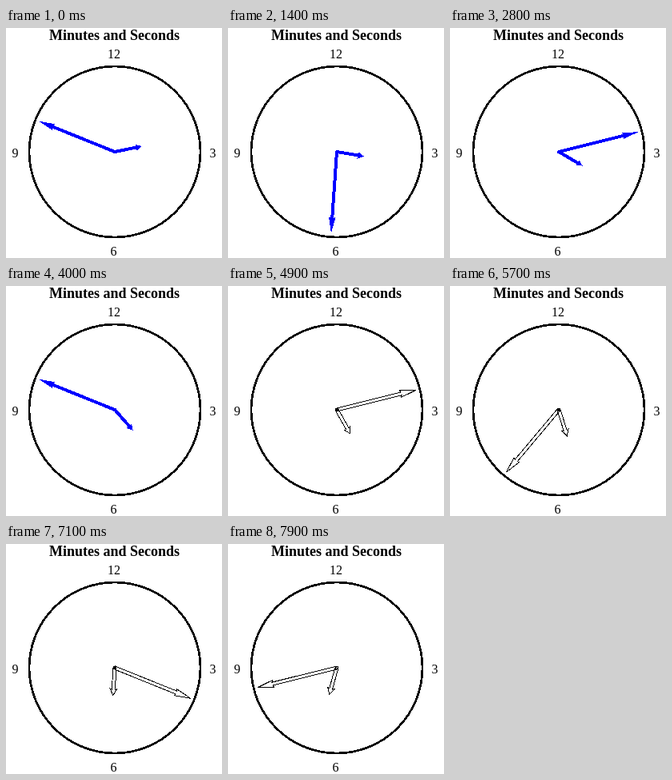
An HTML page that plays this animation: 270x288 px, repeating every 8 s.

```html
<!DOCTYPE html>
<html lang="en">
<head>
<meta charset="utf-8">
<title>Minutes and Seconds</title>
<style>
  html, body { margin: 0; width: 100%; height: 100%; overflow: hidden; background: #fff; }
  svg { display: block; width: 270px; height: 288px; }
  text { font: 16px "Liberation Serif", "Times New Roman", serif; text-anchor: middle; }
  .title { font-size: 18px; font-weight: bold; }
  .shapes { shape-rendering: crispEdges; }
</style>
</head>
<body>
<svg viewBox="0 0 270 288">
  <rect width="270" height="288" fill="#fff"/>
  <text class="title" x="135.5" y="15">Minutes and Seconds</text>
  <text x="135" y="38">12</text>
  <text x="258.5" y="162">3</text>
  <text x="134.5" y="285">6</text>
  <text x="11.5" y="162">9</text>
  <g class="shapes">
    <circle cx="136" cy="155" r="107" fill="none" stroke="#000" stroke-width="2.7"/>
    <g id="hands">
      <path id="minute"/>
      <path id="second"/>
      <circle id="pivot" cx="136" cy="155" r="2"/>
    </g>
  </g>
</svg>
<script>
  const STEP = 100, STEPS = 80;
  const CENTER = { x: 136, y: 155 };
  const [hands, minute, second] =
    ["hands", "minute", "second"].map(id => document.getElementById(id));

  // An arrow from the centre; angle in degrees clockwise from 12.
  function arrow(angle, length, head) {
    const a = angle * Math.PI / 180, sin = Math.sin(a), cos = Math.cos(a);
    const neck = length - head + 1;
    const points = [
      [0, -2], [neck, -2], [length - head, -4.3], [length, 0],
      [length - head, 4.3], [neck, 2], [0, 2]
    ].map(([along, side]) =>
      (CENTER.x + along * sin + side * cos).toFixed(2) + " " +
      (CENTER.y - along * cos + side * sin).toFixed(2));
    return "M" + points.join("L") + "Z";
  }

  function draw(time) {
    const step = Math.floor(time / STEP) % STEPS;
    const tick = Math.floor(step / 2);
    const outlined = step % 2 === 1;
    second.setAttribute("d", arrow(292 + tick * 36, 102, 20));
    minute.setAttribute("d", arrow(78.6 + tick * 3, 34.5, 8));
    hands.setAttribute("fill", outlined ? "none" : "#00f");
    hands.setAttribute("stroke", outlined ? "#000" : "none");
  }

  const start = performance.now();
  function loop() {
    draw(performance.now() - start);
    requestAnimationFrame(loop);
  }
  loop();
</script>
</body>
</html>
```
